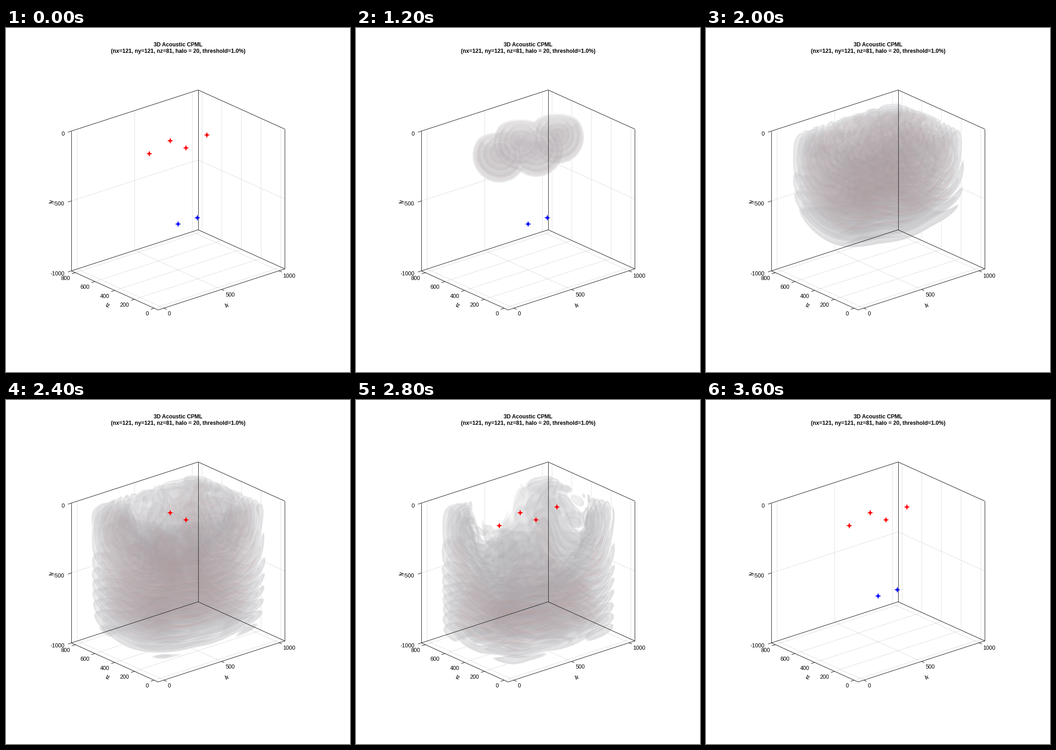
A matplotlib script that plays this animation: 748 by 748 pixels, repeating every 9200 ms.

```python
import numpy as np
import matplotlib.pyplot as plt
from matplotlib.animation import FuncAnimation
from matplotlib.collections import LineCollection
from matplotlib.patches import Polygon

plt.rcParams["font.family"] = "Liberation Sans"
SIZE, DPI = 748, 100
STEP_MS, FRAMES = 200, 46
FIRST, STATES = 4, 14            # the wave is on screen for these frames

# Orthographic projection: pixels per model unit
OU, OV = 334.65, 301.2
XU, XV = 0.2505, -0.0812
ZU, ZV = -0.2142, -0.0966
DV = 0.304


def proj(x, d, z):
    return OU + XU * x + ZU * z, OV + XV * x + ZV * z + DV * d


# ---------------------------------------------------------------- wave field
H = 10.0                         # grid spacing
C0, GRAD, C_SRC = 72.0, 0.08, 80.0
PERIOD = 0.9
z, d, x = (a.astype(np.float32) * np.float32(H) for a in np.ogrid[:81, :101, :101])
SHOTS = [(250, 400), (750, 400), (500, 480), (500, 320)]


def path(sx, sd, sz):
    """Travel time and spreading in a linear velocity gradient."""
    r2 = (x - sx) ** 2 + (d - sd) ** 2 + (z - sz) ** 2
    t = np.arccosh(1 + GRAD ** 2 * r2 / (2 * C_SRC * (C0 + GRAD * d))) / GRAD
    return t.astype(np.float32), (2000 / (np.sqrt(r2) + 30)).astype(np.float32)


def halo(a, width=165.0, both=True):
    edge = np.minimum(a, a.max() - a) if both else a.max() - a
    s = np.clip(1 - edge / width, 0, 1)
    return np.exp(-2.4 * s ** 3) * (1 - s ** 6)


def smooth(a):
    a = np.clip(a, 0, 1)
    return a * a * (3 - 2 * a)


direct = [path(sx, 100, sz) for sx, sz in SHOTS]
ghosts = [path(sx, -100, sz) for sx, sz in SHOTS]     # free surface reflection
absorb = (halo(x) * halo(z) * halo(d, both=False)).astype(np.float32)

# Far from the sources the four fronts travel as one
joint = (-np.log(sum(np.exp(-4 * t) for t, _ in direct)) / 4).astype(np.float32)
merge = smooth((joint - 1.8) / 1.7)
far = (6 * merge * np.tanh(d / 60)).astype(np.float32)
near = (1 - 0.87 * merge).astype(np.float32)
paths = [(t, a * near) for t, a in direct] + [(t, -a * near) for t, a in ghosts]

rng = np.random.default_rng(4)
wobble = np.zeros(absorb.shape, np.float32)
for _ in range(6):
    kx, kd, kz = rng.uniform(-0.018, 0.018, 3)
    wobble += np.sin(kx * x + kd * d + kz * z + rng.uniform(0, 6.28)).astype(np.float32)
wobble *= np.float32(0.2)


def train(time, t, rise):
    s = np.maximum(np.float32(time) - t, 0)
    phase = s * np.float32(2 * np.pi / PERIOD) + wobble * np.minimum(s, 3)
    return (1 - np.exp(-s / np.float32(rise))) * np.sin(phase)


def field(n):
    """Pressure in units of the contour threshold."""
    p = far * train(n + 0.2, joint, 0.8)
    for t, amp in paths:
        p += amp * train(n + 0.25, t, 0.25)
    p *= absorb
    if n >= 7:                   # the bowl left behind by the tail
        m = n - 8
        grow = np.sqrt(min(1, (n - 6) / 2))
        e = np.sqrt(((x - 500) / (380 + 20 * m + 4 * m * m)) ** 2
                    + ((z - 400) / (300 + 28 * m + 3.2 * m * m)) ** 2
                    + (d / (350 + 110 * m + 10 * m * m)) ** 2) / grow
        p *= np.clip((e - 0.92) / 0.35, 0, 1) * (1 - 0.12 * max(0, n - 9))
    return p.astype(np.float32)


# ------------------------------------------------------------ volume drawing
U0, R0, W, HT = 163, 167, 424, 440      # sheared canvas
V0, VH = 130, 482                       # screen rows
SHEAR = -XV / XU
ROW_Z = ZV + SHEAR * ZU
NX, ND = 250, 304

bins = (np.arange(4096) - 2048) / 32


def shell(level, width):
    return np.sign(bins) * np.clip((np.abs(bins) - level) / width + 0.5, 0, 1)


GRAY = (shell(1, 0.3) + 0.8 * shell(2.6, 0.5)).astype(np.float32)
RED = (0.9 * shell(4.8, 1.2)).astype(np.float32)


def lerp_index(pos, top):
    pos = np.clip(pos, 0, top - 1e-3)
    i = pos.astype(int)
    return i, (pos - i).astype(np.float32)


def project(p):
    """Sum the translucent contour shells along every line of sight."""
    q0, g0, r0, gray, red = np.zeros((5, HT, W), np.float32)
    for k in range(161):
        zz = k * 5.0
        cut = p[k // 2] if k % 2 == 0 else (p[k // 2] + p[k // 2 + 1]) * np.float32(0.5)
        j = int(np.ceil(OU + ZU * zz - U0))
        i = int(np.ceil(OV + ROW_Z * zz - R0))
        ix, fx = lerp_index((U0 + j + np.arange(NX) - OU - ZU * zz) / XU / H, 100)
        iy, fy = lerp_index((R0 + i + np.arange(ND) - OV - ROW_Z * zz) / DV / H, 100)
        cut = cut[:, ix] * (1 - fx) + cut[:, ix + 1] * fx
        q = cut[iy] * (1 - fy)[:, None] + cut[iy + 1] * fy[:, None]
        idx = np.clip(q * 32 + 2048, 0, 4095).astype(np.intp)
        g, r = GRAY[idx], RED[idx]
        win = np.s_[i:i + ND, j:j + NX]
        weight = 0.012 + 0.05 / (np.abs(q - q0[win]) + 0.14)
        gray[win] += np.abs(g - g0[win]) * weight
        red[win] += np.abs(r - r0[win]) * weight
        q0[win], g0[win], r0[win] = q, g, r
    return gray, red


def unshear(a):
    rows = (V0 + np.arange(VH))[:, None] + SHEAR * (U0 + np.arange(W) - OU) - R0
    i, f = lerp_index(rows, HT - 1)
    return (np.take_along_axis(a, i, 0) * (1 - f)
            + np.take_along_axis(a, i + 1, 0) * f)


def picture(n):
    gray, red = (unshear(a) for a in project(field(n)))
    tau = gray + red
    share = (red / (tau + 1e-6) * min(1, n / 5))[..., None]
    tint = np.array([146, 144, 150]) * (1 - share) + np.array([150, 104, 104]) * share
    rgb = 255 - (255 - tint) * (tau / (1 + tau))[..., None]
    alpha = np.clip(tau / 0.02, 0, 1)[..., None] * 255
    return np.concatenate([rgb, alpha], 2).astype(np.uint8)


pictures = [picture(n) for n in range(STATES)]

# --------------------------------------------------------------------- stage
fig = plt.figure(figsize=(SIZE / DPI, SIZE / DPI), dpi=DPI, facecolor="white")
ax = fig.add_axes([0, 0, 1, 1])
ax.axis("off")

XL, ZL = (-50, 1050), (-40, 840)
XT, ZT, DT = (0, 500, 1000), (0, 200, 400, 600, 800), (0, 500, 1000)


def lines(paths3d, color, width, zorder):
    segs = [[proj(*pt) for pt in line] for line in paths3d]
    ax.add_collection(LineCollection(segs, colors=color, linewidths=width, zorder=zorder))


grid = [[(a, 0, ZL[1]), (a, 1000, ZL[1]), (a, 1000, ZL[0])] for a in XT]
grid += [[(XL[1], 0, a), (XL[1], 1000, a), (XL[0], 1000, a)] for a in ZT]
grid += [[(XL[0], 500, ZL[1]), (XL[1], 500, ZL[1]), (XL[1], 500, ZL[0])]]
lines(grid, (0, 0, 0, 0.12), 0.72, 1)

left, back, right, front = ((XL[0], ZL[1]), (XL[1], ZL[1]), (XL[1], ZL[0]), (XL[0], ZL[0]))
box = [[(a, 0, b), (a, 1000, b)] for a, b in (left, back, right)]
box += [[(a, 0, b) for a, b in (left, back, right)]]
box += [[(a, 1000, b) for a, b in (left, back, right, front, left)]]
lines(box, "#303030", 0.8, 3)

ticks = [[(a, 1000, ZL[0]), (a, 1000, ZL[0] - 28)] for a in XT]
ticks += [[(XL[0], 1000, a), (XL[0] - 30, 1000, a)] for a in ZT]
ticks += [[(XL[0], a, ZL[1]), (XL[0] - 30, a, ZL[1])] for a in DT]
lines(ticks, "#303030", 0.8, 3)


def label(u, v, text, **kw):
    kw = {"ha": "center", "va": "baseline", "fontsize": 8.64, "zorder": 5, **kw}
    ax.text(u, v, text, **kw)


label(374, 40.3, "3D Acoustic CPML", weight="bold")
label(374, 54.3, "(nx=121, ny=121, nz=81, halo = 20, threshold=1.0%)", weight="bold")
for a in XT:
    label(352 + XU * a, 625.3 - 0.082 * a, str(a), ha="left")
for a in ZT:
    label(310.5 + ZU * a, 625.3 + ZV * a, str(a), ha="right")
for a in DT:
    label(127, 234 + DV * a, str(-a), ha="right")
for u, v, name, angle in ((99, 377, "ly", 90), (480, 604, "lx", 18), (220.5, 604, "lz", -24)):
    label(u, v, name, rotation=angle, va="center")


def star(sx, sd, sz, color):
    u, v = proj(sx, sd, sz)
    turn = np.arange(8) * np.pi / 4
    r = np.where(np.arange(8) % 2, 2.5, 6.6)
    pts = np.c_[u + r * np.sin(turn), v + 0.6 + r * np.cos(turn)]
    return ax.add_patch(Polygon(pts, closed=True, fc=color, ec="none", zorder=4))


shots = [star(sx, 100, sz, "#ff0000") for sx, sz in SHOTS]
wells = [star(sx, 670, 400, "#0000ff") for sx in (500, 667)]

cloud = ax.imshow(pictures[0], extent=(U0, U0 + W, V0 + VH, V0),
                  interpolation="nearest", aspect="auto", zorder=2)
ax.set_xlim(0, SIZE)
ax.set_ylim(SIZE, 0)


def update(i):
    n = i - FIRST
    on = 0 <= n < STATES
    cloud.set_visible(on)
    if on:
        cloud.set_data(pictures[n])
    for k, s in enumerate(shots):
        s.set_visible(not on or n >= (10 if k < 2 else 8))
    for s in wells:
        s.set_visible(not on or n < 5)
    return [cloud, *shots, *wells]


anim = FuncAnimation(fig, update, frames=FRAMES, init_func=lambda: update(0),
                     interval=STEP_MS, repeat=True, repeat_delay=0, blit=False)
plt.show()
```
